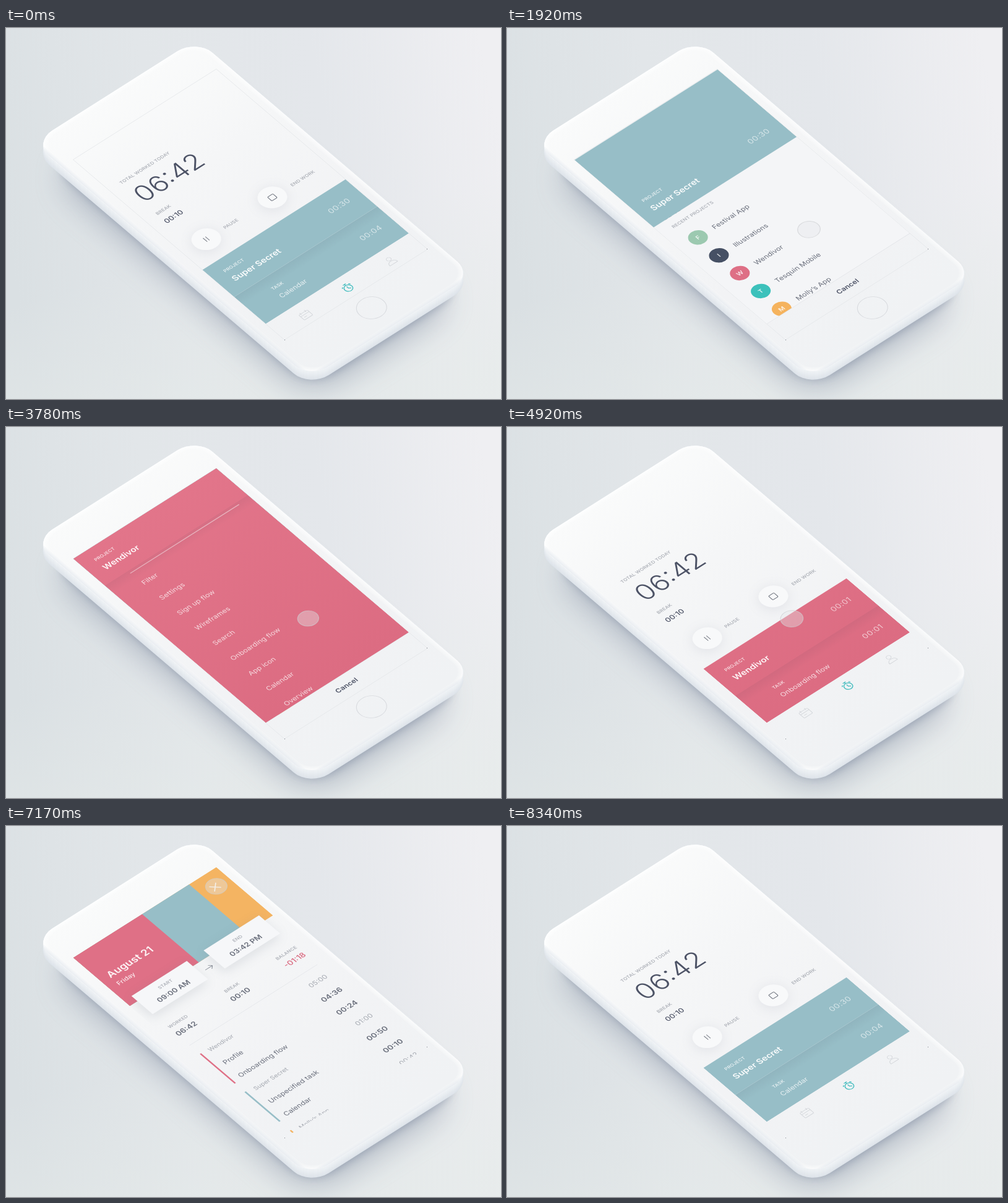
Animation of 800x600 px, one loop 8430 ms. Source, as an HTML page with a canvas:

```html
<!DOCTYPE html>
<html lang="en">
<head>
<meta charset="utf-8">
<title>Time tracker</title>
<style>
html, body { margin: 0; width: 100%; height: 100%; overflow: hidden; background: #e3e6ea; }
canvas { display: block; width: 800px; height: 600px; }
</style>
</head>
<body>
<canvas id="stage" width="800" height="600"></canvas>
<script>
const LOOP = 8430, W = 375, H = 667, BAR = 608;
const TEAL = '#97bec7', RED = '#df7086', ORANGE = '#f4b462';
const INK = '#4d5366', TEXT = '#6a6f7c', MUTED = '#a4a8b0', PAPER = '#f4f5f7';
const CLIENT = 'Wendivor';
const PROJECTS = [['Festival App', '#9cc9b0'], ['Illustrations', '#465064'], [CLIENT, '#de6f85'],
  ['Tesquin Mobile', '#3cc1bb'], ['Molly\u2019s App', '#f5b35e']];
const TASKS = ['Filter', 'Settings', 'Sign up flow', 'Wireframes', 'Search', 'Onboarding flow',
  'App icon', 'Calendar', 'Overview'];
const ENTRIES = [[CLIENT, '05:00', 1], ['Profile', '04:36'], ['Onboarding flow', '00:24'],
  ['Super Secret', '01:00', 1], ['Unspecified task', '00:50'], ['Calendar', '00:10'],
  ['Molly\u2019s App', '00:42', 1]];
const PATH = [[360, 178, 30], [990, 190, 476], [1200, 190, 476], [1920, 230, 464], [2160, 230, 464],
  [2900, 248, 523], [2970, 248, 523], [3780, 248, 443], [3810, 248, 443], [4650, 218, 443],
  [5490, 232, 350], [6450, 232, 350], [7140, 341, 41], [LOOP, 341, 41]];
const TAPS = [1090, 2080, 3810, 5540, 7230];

const stage = document.getElementById('stage');
let c = stage.getContext('2d');

const span = (t, a, b) => Math.min(1, Math.max(0, (t - a) / (b - a)));
const mix = (a, b, k) => a + (b - a) * k;
const smooth = u => u * u * (3 - 2 * u);
const inOut = u => u < .5 ? 4 * u ** 3 : 1 - (2 - 2 * u) ** 3 / 2;
const white = a => `rgba(255,255,255,${a})`;

function layer(alpha, draw) {
  if (alpha <= 0) return;
  c.save();
  c.globalAlpha *= alpha;
  draw();
  c.restore();
}
function clipped(x, y, w, h, draw) {
  c.save();
  c.beginPath();
  c.rect(x, y, w, h);
  c.clip();
  draw();
  c.restore();
}
function label(s, x, y, size, weight, color, align = 'left', spacing = 0) {
  c.font = `${weight} ${size}px Inter, sans-serif`;
  c.letterSpacing = spacing + 'px';
  c.textAlign = align;
  c.fillStyle = color;
  c.fillText(s, x, y);
}
const caps = (s, x, y, color = MUTED, align = 'left') => label(s, x, y, 10.8, 500, color, align, .2);
function box(x, y, w, h, color) {
  c.fillStyle = color;
  c.fillRect(x, y, w, h);
}
function disc(x, y, r, color) {
  c.beginPath();
  c.arc(x, y, r, 0, 7);
  c.fillStyle = color;
  c.fill();
}
function rounded(x, y, w, h, r) {
  const path = new Path2D();
  path.roundRect(x, y, w, h, r);
  return path;
}
function stroke(d, x, y, color, width) {
  c.save();
  c.translate(x, y);
  c.strokeStyle = color;
  c.lineWidth = width;
  c.lineCap = c.lineJoin = 'round';
  c.stroke(new Path2D(d));
  c.restore();
}
function withShadow(color, blur, dx, dy, draw) {
  c.save();
  c.shadowColor = color;
  c.shadowBlur = blur;
  c.shadowOffsetX = dx;
  c.shadowOffsetY = dy;
  draw();
  c.restore();
}
function ramp(x0, y0, x1, y1, ...colors) {
  const g = c.createLinearGradient(x0, y0, x1, y1);
  colors.forEach((color, i) => g.addColorStop(i / (colors.length - 1), color));
  return g;
}
const tilt = (dy = 0) => c.setTransform(.617, -.3907, .512, .437, 108.5, 212.9 + dy);

// Background and phone body never change, so they are painted once.
function paintBody() {
  const canvas = document.createElement('canvas');
  canvas.width = 800;
  canvas.height = 600;
  const main = c;
  c = canvas.getContext('2d');
  box(0, 0, 800, 600, ramp(0, 340, 800, 180, '#dae0e3', '#e2e6e9', '#e4e7eb', '#efeff2'));
  box(0, 0, 800, 600, ramp(560, 300, 640, 600, 'rgba(230,235,234,0)', 'rgba(230,235,234,.7)'));

  const body = rounded(-30, -90, 428, 873, 50), depth = 14;
  const fill = (color, path = body) => { c.fillStyle = color; c.fill(path); };
  tilt();
  withShadow('rgba(118,130,152,.5)', 52, -3, 46, () => fill('#dde2e8', rounded(-8, -55, 385, 820, 70)));
  withShadow('rgba(100,114,140,.5)', 16, 0, 22, () => fill('#dde2e8', rounded(-18, -50, 400, 823, 60)));
  for (let i = depth; i >= 0; i--) {
    const k = i / depth;
    tilt(i);
    fill(`rgb(${mix(240, 222, k)},${mix(243, 228, k)},${mix(246, 234, k)})`);
  }
  tilt();
  fill(ramp(0, -90, 60, 780, '#fafbfb', '#f5f6f7', '#f2f3f5', '#f0f2f4'));
  c.save();
  c.clip(body);
  c.strokeStyle = white(.2);
  for (const width of [20, 14, 8, 4]) {
    c.lineWidth = width;
    c.stroke(body);
  }
  // Lower-left and bottom rims curve away from the light.
  const rim = 'rgba(226,231,237,.75)', clear = 'rgba(226,231,237,0)';
  box(-30, -90, 10, 873, ramp(-30, 0, -20, 0, rim, clear));
  box(-30, 773, 428, 10, ramp(0, 783, 0, 773, rim, clear));
  c.restore();
  c = main;
  return canvas;
}

function projectRow(top, height, color, name, time, timeAlpha) {
  const end = top + height, lift = (height - 100) / 45;
  box(0, top, W, height, color);
  caps('PROJECT', 29.5, end - 63.5 - lift, white(.85));
  label(name, 29, end - 31.5 - lift, 19.5, 600, white(.95));
  layer(timeAlpha, () => label(time, 345, end - 46, 18, 400, white(.62), 'right', .5));
}
function rowShade(y, h = 28) {
  box(0, y, W, h, ramp(0, y, 0, y + h, 'rgba(50,50,70,.065)', 'rgba(50,50,70,0)'));
}
function taskRow(top, color, name, time) {
  box(0, top, W, 100, color);
  rowShade(top);
  caps('TASK', 70, top + 38.5, white(.85));
  label(name, 69.5, top + 67, 16, 400, white(.78));
  label(time, 345, top + 54, 18, 400, white(.62), 'right', .5);
}

function homeContent() {
  caps('TOTAL WORKED TODAY', 29, 117.5);
  label('06:42', 30.5, 187.5, 60, 300, INK);
  caps('BREAK', 29, 231.5);
  label('00:10', 28, 262, 17, 500, INK);
  for (const x of [60, 233]) {
    withShadow('rgba(120,130,150,.15)', 20, 0, 3, () => disc(x, 348, 30, '#f8f9fa'));
  }
  stroke('M-3 -6V6M3 -6V6', 60, 348, '#777c86', 1.5);
  stroke('M-5 -7H5Q7 -7 7 -5V5Q7 7 5 7H-5Q-7 7 -7 5V-5Q-7 -7 -5 -7Z', 233, 348, '#777c86', 1.6);
  caps('PAUSE', 106, 352);
  caps('END WORK', 282, 352);
}
function tabs(y) {
  const pale = '#d3d6da';
  stroke('M-9 -8H9Q11 -8 11 -6V8Q11 10 9 10H-9Q-11 10 -11 8V-6Q-11 -8 -9 -8ZM-11 -2H11M-6 -11V-6M6 -11V-6M-6 4H0', 76, y, pale, 1.3);
  stroke('M9 1A9 9 0 1 1 -9 1A9 9 0 1 1 9 1M-3 -12H3M0 -12V-8M8 -8L10 -6M-8 -8L-10 -6M0 -4V1L4 4', 187.5, y, '#45bdbf', 1.9);
  stroke('M5 -6A5 5 0 1 1 -5 -6A5 5 0 1 1 5 -6M-10 10Q-10 1 0 1Q10 1 10 10Z', 299, y, pale, 1.3);
}

function picker(k) {
  const top = mix(408, 0, k), height = mix(100, 250, k), end = top + height;
  clipped(0, 0, W, BAR, () => {
    box(0, end, W, BAR - end, PAPER);
    layer(span(k, .3, .9), () => {
      const shift = (1 - k) * 130;
      caps('RECENT PROJECTS', 28.5, 279.5 + shift);
      PROJECTS.forEach(([name, color], i) => {
        const y = 331.5 + i * 66 + shift * (1 + i * .2);
        disc(49, y, 20, color);
        label(name[0], 49, y + 5, 14, 600, white(.85), 'center');
        label(name, 88.5, y + 5.5, 16, 400, TEXT);
      });
    });
    taskRow(mix(508, 640, k), TEAL, 'Calendar', '00:04');
    projectRow(top, height, TEAL, 'Super Secret', '00:30', 1);
  });
  layer(k, () => box(0, BAR - .5, W, 1, '#dfe1e5'));
}

function taskList(offset, alpha, hidden) {
  layer(alpha, () => {
    box(60, 107 + offset, 285, 2, white(.5));
    TASKS.forEach((task, i) => {
      if (task !== hidden) label(task, 60.5, 151.5 + i * 56.1 + offset, 16, 400, white(.75));
    });
  });
}
function taskScreen(t) {
  const open = inOut(span(t, 2100, 2900)), offset = 80 * (1 - smooth(span(t, 2970, 3780)));
  const top = mix(431, 0, open), bottom = mix(497, BAR, open);
  layer(span(open, 0, .15), () => clipped(0, top, W, bottom - top, () => {
    box(0, top, W, bottom - top, ramp(0, 0, 0, BAR, '#e2758a', '#dc6c82'));
    clipped(0, 100, W, BAR - 100, () => {
      taskList(offset + (1 - open) * 150, span(open, .5, 1));
      layer(open, () => rowShade(100));
    });
    layer(open, () => caps('PROJECT', 29.5, top + 36.5, white(.85)));
    label(CLIENT, mix(88.5, 29, open), mix(469, 68.5, open), mix(16, 19.5, open), 600, white(.95));
  }));
}
function taskChosen(t) {
  const k = inOut(span(t, 3840, 4600)), top = 408 * k, body = top + 100;
  clipped(0, 0, W, BAR, () => {
    box(0, top, W, BAR - top, ramp(0, 0, 0, BAR, '#e2758a', '#dc6c82'));
    clipped(0, body, W, BAR - body, () => {
      taskList(0, 1 - span(k, 0, .45), 'Onboarding flow');
      layer(k, () => {
        caps('TASK', 70, body + 38.5, white(.85));
        label('00:01', 345, body + 54, 18, 400, white(.65), 'right', .5);
      });
      label('Onboarding flow', mix(60.5, 69.5, k), mix(432, 575, k), 16, 400, white(.78));
      rowShade(body);
    });
    projectRow(top, 100, 'rgba(0,0,0,0)', CLIENT, '00:01', k);
  });
}

function home(t) {
  const leaving = smooth(span(t, 5590, 5790)), back = smooth(span(t, 7700, 8130));
  const pick = inOut(span(t, 1200, 1990)), settled = inOut(span(t, 3840, 4600));
  const cancel = t < 7000 ? pick * (1 - settled) : 0;
  layer(t < 7000 ? 1 - leaving : back, () => {
    homeContent();
    c.save();
    c.translate(0, t < 7000 ? leaving * 150 : (1 - back) * 150);
    if (t >= 3840 && t < 7000) taskChosen(t);
    else {
      picker(t < 7000 ? pick : 0);
      if (t > 2100 && t < 7000) taskScreen(t);
    }
    c.restore();
    layer(1 - cancel, () => tabs(t > 3800 && t < 7000 ? 638.5 : 642));
    layer(cancel, () => label('Cancel', 187.5, 642.5, 16, 600, INK, 'center'));
  });
}

function card(x, title, time) {
  withShadow('rgba(110,120,140,.18)', 18, 0, 5, () => box(x, 160, 145, 67, '#f6f7f9'));
  caps(title, x + 72, 184, MUTED, 'center');
  label(time, x + 72, 212, 17, 600, TEXT, 'center');
}
function day(t) {
  const leave = smooth(span(t, 7320, 7900));
  const away = t < 7000 ? (1 - span(t, 5650, 6350)) ** 3 : leave;
  const show = t < 7000 ? span(t, 5640, 5800) : 1 - smooth(span(t, 7560, 7880));
  layer(show, () => {
    [[ORANGE, 375, 5694], [TEAL, 303.5, 5892], [RED, 180.5, 6020]].forEach(([color, w, start]) =>
      box(0, 0, w * inOut(span(t, start, start + 400)) * (1 - leave), 179, color));
    stroke('M-8 -8L8 8M8 -8L-8 8', 338, 41 + 512 * away, white(.9), 2);
    const x = 20 - 112 * away;
    label('August 21', x, 94, 24, 600, white(.92));
    label('Friday', x, 121, 15, 500, white(mix(.85, .4, Math.min(1, away * 3))));

    c.save();
    c.translate(0, 406 * away);
    caps('WORKED', 20.5, 280.5);
    label('06:42', 19.5, 309, 17.5, 600, TEXT);
    caps('BREAK', 186, 280.5, MUTED, 'center');
    label('00:10', 186.5, 309, 17.5, 600, TEXT, 'center');
    caps('BALANCE', 355, 280.5, MUTED, 'right');
    label('-01:18', 355, 309, 18, 500, '#d9667d', 'right');
    box(20, 342.5, 335, 1, '#e3e5e9');
    [[375, RED, 110], [516, TEAL, 110], [659, ORANGE, 60]].forEach(([y, color, h]) => box(20.5, y, 3.5, h, color));
    ENTRIES.forEach(([name, time, head], i) => {
      const y = 384.5 + i * 47.8;
      label(name, 40.5, y, head ? 14 : 16, 400, head ? MUTED : TEXT);
      label(time, 349, y, head ? 16 : 17.5, head ? 400 : 600, head ? MUTED : TEXT, 'right');
    });
    c.restore();

    c.save();
    c.translate(0, 100 * away);
    card(20, 'START', '09:00 AM');
    card(209, 'END', '03:42 PM');
    c.restore();
    stroke('M-9 0H9M3 -6L9 0L3 6', 186.5, 204, '#898e98', 1.4);
  });
}

function cursor(t) {
  const alpha = Math.min(span(t, 360, 480), 1 - span(t, 7340, 7580));
  if (alpha <= 0) return;
  const i = PATH.findIndex(step => step[0] > t);
  const [t0, x0, y0] = PATH[i - 1], [t1, x1, y1] = PATH[i];
  const k = smooth(span(t, t0, t1));
  const press = Math.max(...TAPS.map(tap => 1 - Math.abs(t - tap) / 120), 0);
  layer(alpha, () => {
    disc(mix(x0, x1, k), mix(y0, y1, k), 22.8 - 2 * press, 'rgba(228,229,232,.4)');
    c.strokeStyle = 'rgba(205,206,210,.65)';
    c.lineWidth = 1.6;
    c.stroke();
  });
}

// Faint screen edge and home button, shown until a task is chosen.
function frameLines() {
  c.lineWidth = 1;
  c.strokeStyle = '#e3e5e8';
  c.strokeRect(0, 0, W, H);
  c.beginPath();
  c.arc(187.5, 716, 30.5, 0, 7);
  c.strokeStyle = '#d9dbdf';
  c.lineWidth = 1.4;
  c.stroke();
}

const body = paintBody();
function draw(t) {
  c.setTransform(1, 0, 0, 1, 0, 0);
  c.drawImage(body, 0, 0);
  tilt();
  if (t < 3810) frameLines();
  clipped(0, 0, W, H, () => {
    if (t < 5800 || t > 7690) home(t);
    if (t > 5640 && t < 7900) day(t);
    cursor(t);
  });
  c.setTransform(1, 0, 0, 1, 0, 0);
  box(450, 504, 1, 1, '#777c84');
  box(680, 357, 1, 1, '#777c84');
}

let start;
function tick(now) {
  start ??= now;
  draw((now - start) % LOOP);
  requestAnimationFrame(tick);
}
draw(0);
requestAnimationFrame(tick);
</script>
</body>
</html>
```
